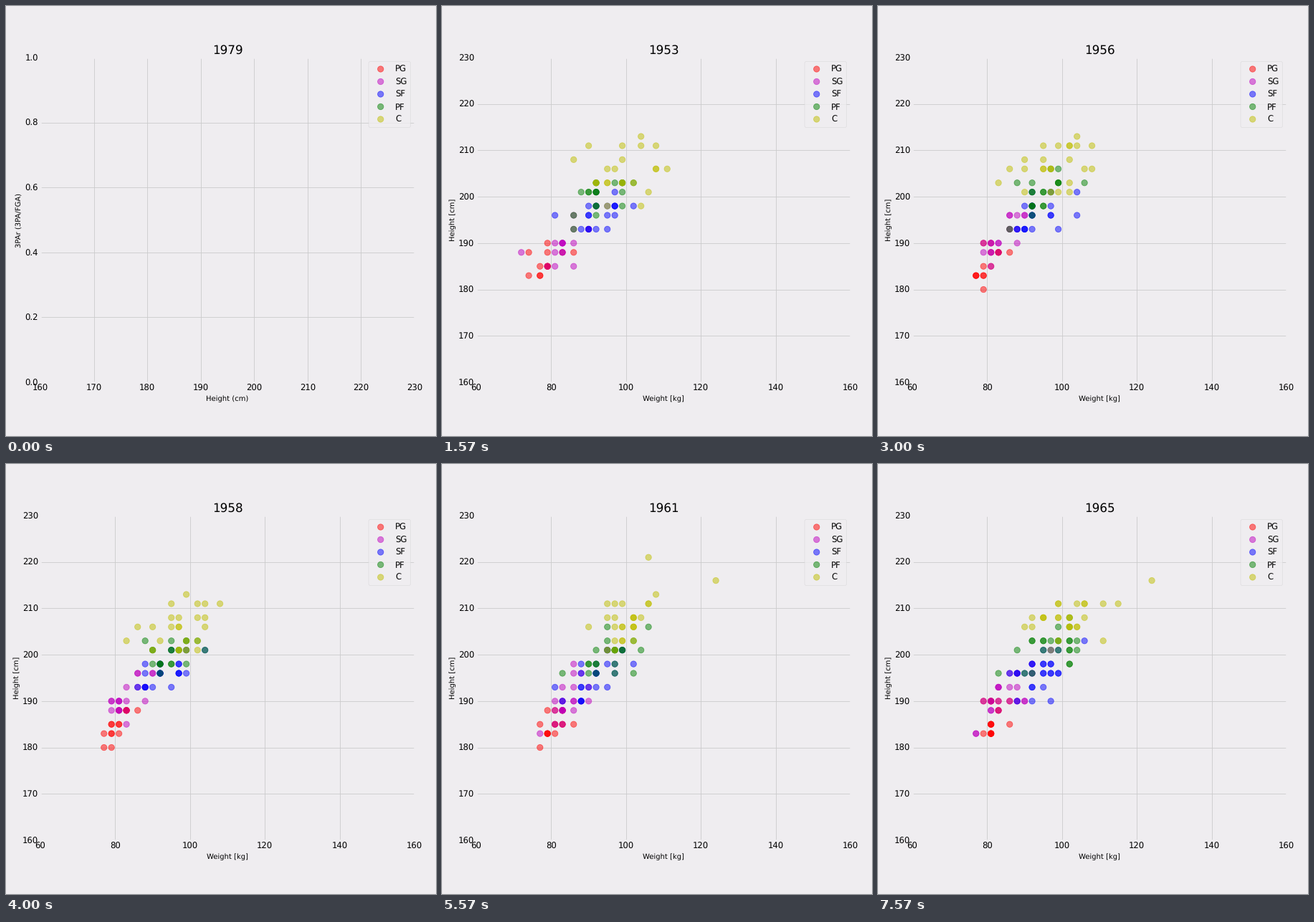
A matplotlib script for the animation above (8 s loop, 600 by 600 pixels).

```python
import random

import matplotlib.pyplot as plt
import numpy as np
from matplotlib.animation import FuncAnimation
from matplotlib.patches import FancyBboxPatch

BACK = "#efedf0"
FIRST, LAST = 1951, 1965
TICK_MS = 40
TICKS = 200

# colour, places in the first and last season, mean inches, spread,
# mean pounds, pounds per inch, spread
ROLES = {
    "PG": ("r", 13, 19, 73.0, 1.2, 178, 3, 5),
    "SG": ("m", 15, 24, 74.7, 1.5, 184, 4, 6),
    "SF": ("b", 18, 28, 76.8, 1.2, 202, 6, 8),
    "PF": ("g", 20, 24, 78.8, 1.3, 209, 4, 9),
    "C": ("y", 20, 26, 80.9, 1.4, 217, 3, 12),
}
# Outliers: role, first and last season, pounds, inches
OUTLIERS = [("SG", 1951, 1955, 160, 74), ("C", 1960, 1965, 275, 85),
            ("C", 1960, 1964, 235, 87)]


def metric(pounds, inches):
    return int(pounds * 0.4536), round(inches * 2.54)


def careers(role):
    """List (first season, last season, (kg, cm)) for every player of a role."""
    _, start, stop, inch, inch_sd, pound, slope, pound_sd = ROLES[role]
    rng = random.Random(role)
    players = [(a, b, metric(lb, tall))
               for r, a, b, lb, tall in OUTLIERS if r == role]
    for place in range(stop):
        year = FIRST - rng.randint(0, 3)
        if place >= start:
            year = rng.randint(FIRST + 1, LAST)
        while year <= LAST:
            end = year + rng.randint(1, 5)
            z = max(-2, min(2, rng.gauss(0, 1)))
            tall = round(inch + 0.03 * (year - FIRST) + z * inch_sd)
            lb = (pound + 0.3 * (year - FIRST) + slope * (tall - inch)
                  + rng.gauss(0, pound_sd))
            players.append((year, end, metric(5 * round(lb / 5), tall)))
            year = end + 1
    return players


def draw_key():
    """Draw the colour key on an overlay measured in pixels."""
    key = fig.add_axes([0, 0, 1, 1], xlim=(0, 600), ylim=(600, 0))
    key.axis("off")
    key.add_patch(FancyBboxPatch(
        (506, 77.5), 58.5, 92, boxstyle="round,pad=0,rounding_size=2.3",
        fc=BACK, ec="0.8", lw=0.5, alpha=0.8))
    for row, (role, spec) in enumerate(ROLES.items()):
        y = 88 + 17.5 * row
        key.scatter([522.7], [y], color=spec[0], **DOT)
        key.text(543.2, y + 4.3, role)


plt.rcParams.update({"font.family": "DejaVu Sans", "font.size": 14,
                     "text.hinting": "none"})
# Two equal line widths keep the dots at sub-pixel positions.
DOT = {"s": 100, "alpha": 0.5, "linewidths": [1, 1]}

fig = plt.figure(figsize=(10, 10), dpi=60, facecolor=BACK)
ax = fig.add_axes([0.08, 0.125, 0.87, 0.755], facecolor=BACK)
ax.set_axisbelow(True)
ax.grid(color="#cbcbcb", lw=1)
ax.tick_params(length=0, pad=3.5)
for spine in ax.spines.values():
    spine.set(color=BACK, linewidth=3)

players = {role: careers(role) for role in ROLES}
clouds = {role: ax.scatter([], [], color=spec[0], **DOT)
          for role, spec in ROLES.items()}
draw_key()


def set_axes(title, xlabel, ylabel, xticks, yticks):
    ax.set_title(title, fontsize=20.16)
    ax.set_xlabel(xlabel, fontsize=12)
    ax.set_ylabel(ylabel, fontsize=12)
    ax.set(xticks=xticks, yticks=yticks,
           xlim=(xticks[0], xticks[-1]), ylim=(yticks[0], yticks[-1]))


def update(i):
    second, rest = divmod(i, 25)
    step = 2 * second + (rest >= 14)
    year = FIRST + step - 1
    heights = np.arange(160, 231, 10)
    if step == 0:
        set_axes("1979", "Height (cm)", "3PAr (3PA/FGA)",
                 heights, np.linspace(0, 1, 6))
    else:
        set_axes(str(year), "Weight [kg]", "Height [cm]",
                 np.arange(60, 161, 20), heights)
    for role, cloud in clouds.items():
        dots = [dot for a, b, dot in players[role] if step and a <= year <= b]
        cloud.set_offsets(np.array(dots, float).reshape(-1, 2))
    return list(clouds.values())


anim = FuncAnimation(fig, update, frames=TICKS, interval=TICK_MS,
                     repeat=True, repeat_delay=0, blit=False)
plt.show()
```
